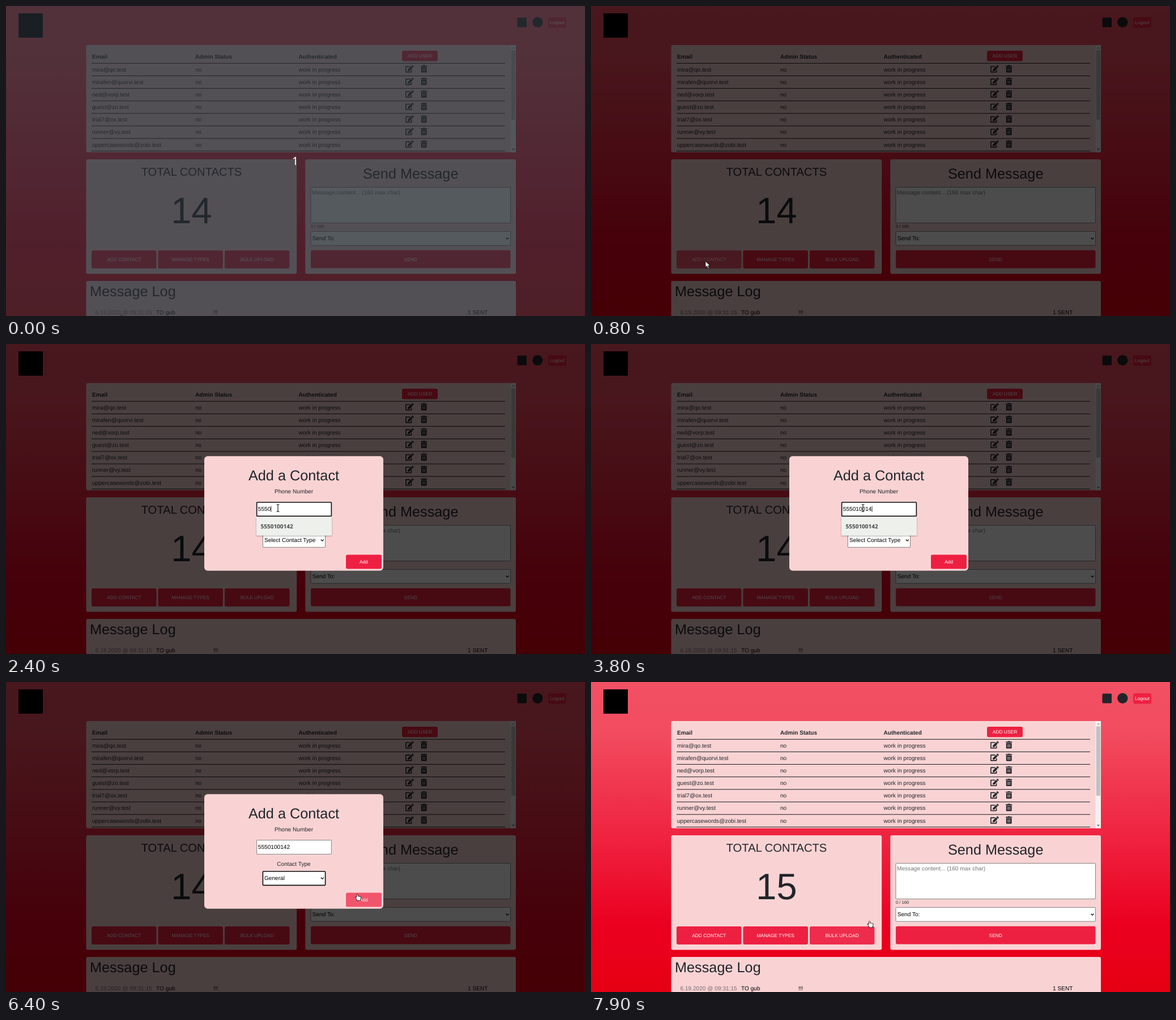
Write an HTML page that moves like this. It is 1022x548 px and loops after 8000 ms.

```html
<!DOCTYPE html>
<html lang="en">
<head>
<meta charset="utf-8">
<title>Add a contact</title>
<style>
  html, body { margin: 0; width: 100%; height: 100%; overflow: hidden; background: #ee2041; }
  svg { display: block; width: 1022px; height: 548px; }
  text { font: 10.12px "Liberation Sans", Arial, sans-serif; fill: #212529; white-space: pre; }
  .b { font-weight: bold; }
  .h1 { font-size: 25.28px; }
  .h2 { font-size: 20.22px; }
  .mid { text-anchor: middle; }
  .btn text { font-size: 8.43px; fill: #fff; text-anchor: middle; }
  .btn rect { fill: #ee2041; }
  .panel { fill: #f9d3d4; }
  .field { fill: #fff; stroke: #767676; stroke-width: .9; }
  .in { fill: #000; }
  .hint { fill: #757575; }
  .pop text { font-family: "Noto Sans", "Open Sans", sans-serif; font-size: 10px; font-weight: 600; fill: #454545; }
  .ring { fill: none; stroke: #101010; stroke-width: 1.6; }
  .chev { fill: none; stroke: #000; stroke-width: 1.3; }
</style>
</head>
<body>
<svg id="stage" viewBox="0 0 1022 548" text-rendering="geometricPrecision"></svg>
<script>
const LOOP = 8000, STEP = 100;
const PHONE = "5550100142", HINT = "555-010-0142";
const PAST = [PHONE, "5550100167", "5550100119", "5550100183", "5550100126", "5550100158"];
const EMAILS = ["mira@qo.test", "mirafen@quorvi.test", "ned@vorp.test", "guest@zo.test",
  "trial7@ox.test", "runner@vy.test", "uppercasewords@zobi.test"];
const TYPES = ["Select Contact Type", "General", "Reporters", "Medic"];
const ROW = 22.14, POP_ROW = 22.6, OPT = 20.2;

const text = (x, y, s, cls = "", id = "") => `<text x="${x}" y="${y}" class="${cls}" id="${id}">${s}</text>`;
const rect = (x, y, w, h, r = 0, attrs = "") =>
  `<rect x="${x}" y="${y}" width="${w}" height="${h}" rx="${r}" ${attrs}/>`;
const button = (x, y, w, h, s, id = "") =>
  `<g class="btn" id="${id}">${rect(x, y, w, h, 3)}${text(x + w / 2, y + h / 2 + 2.9, s)}</g>`;
const chevron = (x, y) => `<path class="chev" d="M${x - 2.4} ${y - 1.2}l2.4 2.4 2.4-2.4"/>`;

const tableRow = (email, i) => {
  const y = 115.7 + i * ROW, top = 104.6 + i * ROW;
  return text(152, y, email) + text(334, y, "no") + text(516.5, y, "work in progress") +
    `<use href="#edit" transform="translate(705 ${top}) scale(.0254)"/>
     <use href="#trash" transform="translate(732 ${top}) scale(.0254)"/>`;
};
const lines = Array.from({ length: 8 }, (_, i) => rect(151, 100.8 + i * ROW, 730, 1, 0, 'fill="#1b1b1e"')).join("");

const defs = `<defs>
  <linearGradient id="sky" x2="0" y2="1">
    <stop stop-color="#f25064"/><stop offset=".16" stop-color="#f24c60"/>
    <stop offset=".5" stop-color="#ef2340"/><stop offset=".78" stop-color="#eb0020"/>
    <stop offset="1" stop-color="#e60012"/>
  </linearGradient>
  <filter id="soft" x="-10%" y="-10%" width="120%" height="130%">
    <feDropShadow dx="0" dy="1" stdDeviation="1" flood-opacity=".4"/>
  </filter>
  <g id="edit" fill="#212529">
    <path d="M325 96H48Q32 96 32 112V464Q32 480 48 480H400Q416 480 416 464V315" fill="none" stroke="#212529" stroke-width="64"/>
    <path d="M160 416l10-115L396 76 500 180 274 406zM420 54l40-40q28-28 56 0l49 49q28 28 0 56l-40 40z"/>
  </g>
  <g id="trash" fill="#212529">
    <path d="M16 32H128L150 0H298L320 32H432Q448 32 448 48V80Q448 96 432 96H16Q0 96 0 80V48Q0 32 16 32z"/>
    <path fill-rule="evenodd" d="M32 128H416V464a48 48 0 0 1-48 48H80a48 48 0 0 1-48-48zM128 208v224h32V208zM208 208v224h32V208zM288 208v224h32V208z"/>
  </g>
</defs>`;

const page = rect(0, 0, 1022, 548, 0, 'fill="url(#sky)"') +
  rect(22, 13, 43, 43) +
  rect(902.5, 20.5, 16.5, 17, 1.5, 'fill="#212529"') +
  '<circle cx="938.3" cy="28.8" r="9.2" fill="#212529"/>' +
  button(957, 20, 32, 18.5, "Logout") +
  rect(141.5, 69, 758.5, 189.5, 3, 'class="panel"') +
  text(152, 93.2, "Email", "b") + text(334, 93.2, "Admin Status", "b") +
  text(516.5, 93.2, "Authenticated", "b") +
  button(699, 79, 63, 18.5, "ADD USER") + lines + EMAILS.map(tableRow).join("") +
  rect(890.5, 69, 9.5, 189.5, 0, 'fill="#f1f1f1"') + rect(891.8, 78.5, 7.2, 122.5, 0, 'fill="#c1c1c1"') +
  '<path d="M893 75.2h5l-2.5-2.6z" fill="#a3a3a3"/><path d="M893 252.5h5l-2.5 2.6z" fill="#505050"/>' +
  rect(141.5, 271, 371.7, 202.5, 3, 'class="panel"') +
  text(327.5, 300, "TOTAL CONTACTS", "h2 mid") +
  `<text id="count" x="327.5" y="384.3" class="mid" style="font-size:65px"></text>` +
  button(151, 432, 114.5, 32, "ADD CONTACT", "addContact") +
  button(268.5, 432, 114.5, 32, "MANAGE TYPES") +
  button(386, 432, 114.5, 32, "BULK UPLOAD", "bulk") +
  rect(528.3, 271, 371.7, 202.5, 3, 'class="panel"') +
  text(714.2, 304.8, "Send Message", "h1 mid") +
  rect(538, 320.5, 352.5, 63, 1.5, 'class="field" id="area"') +
  text(540, 333.2, "Message content... (160 max char)", "hint") +
  `<text x="538" y="392" style="font-size:7.6px">0 / 160</text>` +
  rect(538, 398.5, 352.5, 24.7, 1.5, 'class="field"') +
  text(540.7, 414.4, "Send To:", "in") + chevron(885, 411) +
  button(538, 431.7, 352.5, 31.8, "SEND") +
  rect(141.5, 486, 758.5, 70, 3, 'class="panel"') +
  text(148, 513.3, "Message Log", "h1") +
  `<text x="157.5" y="545" style="fill:#77696f">6.19.2020 @ 09:31:15</text>` +
  text(265, 545, "TO gub", "in") + text(366, 545, "!!!", "in") + text(815, 545, "1 SENT", "in");

const option = (s, i) =>
  `<g><rect class="hot" x="454" y="${380.9 + (i - 1) * OPT}" width="109" height="19.6" fill="#f07746" stroke="#000" stroke-width="1.4"/>
   ${text(456.3, 373.8 + i * OPT, s, i ? "in opt" : "hint opt")}</g>`;

const modal = `<g id="modal">` +
  rect(350, 198.3, 316, 202.5, 6, 'class="panel"') +
  text(508, 241.3, "Add a Contact", "h1 mid") +
  text(508, 263.6, "Phone Number", "mid") +
  rect(442.6, 279.6, 131.8, 24.8, .5, 'class="field" id="phoneBox"') +
  rect(442.6, 279.8, 131.8, 24.6, 1.5, 'class="ring" id="phoneRing"') +
  text(444.8, 295.3, "", "in", "phone") +
  rect(0, 286.5, .8, 10.5, 0, 'id="caret"') +
  text(508, 325, "Contact Type", "mid") +
  rect(453.4, 334.6, 110.2, 24.8, .5, 'class="field" id="typeBox"') +
  rect(453.4, 334.8, 110.2, 24.6, 1.5, 'class="ring" id="typeRing"') +
  text(456, 350.3, "", "in", "type") + chevron(558.3, 347) +
  button(600, 372.5, 63, 25, "Add", "add") +
  `<g id="past" class="pop">${rect(442, 305.5, 133, 33, 1, 'id="pastBox" fill="#eef0ec" filter="url(#soft)"')}` +
  PAST.map((s, i) => text(449.5, 325.6 + i * POP_ROW, s, "past")).join("") + "</g>" +
  `<g id="list">${rect(453.4, 360, 110.2, 81.6, 0, 'fill="#f7f7f7" stroke="#8a8a8a" stroke-width=".8"')}` +
  TYPES.map(option).join("") + "</g></g>";

const cursors = `<g id="cursor" stroke-linejoin="round">
  <path class="ptr" d="M0 0v11l2.6-2.4 1.7 4 2-.8-1.7-3.9h3.4z" fill="#fff" stroke="#111" stroke-width=".9"/>
  <path class="ptr" d="M-1.2.9V6.2L-2.6 5Q-4 4.6-3.6 6L-.8 9.5V11.5H5.5V9.5Q7 7 6.6 4.8 5 3.8 4.8 4.5 3.6 3.4 3.2 4.2 2 3.2 1.2 3.8V.9Q0-.9-1.2.9z" fill="#fff" stroke="#111" stroke-width=".9"/>
  <path class="ptr" d="M-2.4-6.5Q0-6.5 0-5 0-6.5 2.4-6.5M0-5V5M-2.4 6.5Q0 6.5 0 5 0 6.5 2.4 6.5" fill="none" stroke="#222" stroke-width="1.2"/>
</g>`;

document.getElementById("stage").innerHTML = defs + page +
  rect(0, 0, 1022, 548, 0, 'id="shade" fill="#000" fill-opacity=".7"') + modal + cursors +
  `<g id="start">${rect(0, 0, 1022, 548, 0, 'fill="#22292f" fill-opacity=".77"')}
   <text x="510.5" y="281" class="mid" style="font:20px 'Noto Sans',sans-serif;fill:#fff">1</text></g>`;

const $ = id => document.getElementById(id);
const all = cls => [...document.getElementsByClassName(cls)];
const ptrs = all("ptr"), hots = all("hot"), opts = all("opt"), past = all("past");
const ARROW = 0, HAND = 1, BEAM = 2;

// Rows are [time, value...]; each holds until the next.
const CURSOR = [
  [0, 203, 545, ARROW], [100, 203, 538, ARROW], [200, 203, 520, ARROW], [300, 203, 494, ARROW],
  [400, 203, 470, ARROW], [500, 203, 455, HAND], [600, 202, 451, HAND], [800, 202, 451, ARROW],
  [1000, 222, 440, ARROW], [1100, 285, 405, ARROW], [1200, 360, 365, ARROW], [1300, 425, 332, ARROW],
  [1400, 460, 315, ARROW], [1500, 470, 311, ARROW], [1700, 479, 293, BEAM], [1800, 480, 290, BEAM],
  [4600, 485, 303, ARROW], [4700, 494, 328, ARROW], [4800, 498, 341, ARROW], [5200, 498, 354, ARROW],
  [5300, 496, 375, ARROW], [5400, 494, 393, ARROW], [5500, 493, 401, ARROW], [5600, 493, 404, ARROW],
  [5700, 494, 399, ARROW], [5800, 495, 396, ARROW], [6000, 500, 394, ARROW], [6100, 535, 388, ARROW],
  [6200, 585, 381, ARROW], [6300, 613, 376, HAND], [6400, 620, 375, HAND], [6500, 623, 376, HAND],
  [6600, 624, 377, HAND], [6900, 624, 377, BEAM], [7500, 590, 392, ARROW], [7600, 520, 428, ARROW],
  [7700, 486, 443, HAND], [7800, 487, 436, HAND], [7900, 491.5, 422.5, HAND]
];
const START = [[0, 1], [100, .5], [200, .15], [300, 0]];
const MODAL = [[0, 0], [900, .6], [1000, 1], [6900, 0]];
const TYPED = [[0, 0], [2000, 1], [2100, 2], [2200, 3], [2400, 4], [2700, 5], [2900, 6],
  [3400, 7], [3700, 8], [3800, 9], [4100, 10]];
const MATCHES = [[0, 0], [1800, 6], [2100, 3], [2400, 1], [4200, 0]];
const HOT = [[0, 0], [5300, 1], [5500, 2], [5700, 1]];
const ADD_CONTACT = [[0, 1], [500, .85], [600, .7], [900, .85], [1000, 1]];
const ADD = [[0, 1], [6300, .85], [6400, .7]];
const BULK = [[0, 1], [7700, .85], [7800, .75], [7900, .92]];

const at = (rows, t) => rows.findLast(r => r[0] <= t).slice(1);
const show = (el, on) => { el.style.display = on ? "" : "none"; };
const fade = (id, rows, t) => { $(id).style.opacity = at(rows, t)[0]; };
const within = (t, a, b) => t >= a && t < b;

function draw(t) {
  const [x, y, kind] = at(CURSOR, t);
  $("cursor").setAttribute("transform", `translate(${x} ${y})`);
  ptrs.forEach((p, i) => show(p, i === kind));
  fade("start", START, t);
  fade("modal", MODAL, t);
  fade("addContact", ADD_CONTACT, t);
  fade("add", ADD, t);
  fade("bulk", BULK, t);
  show($("shade"), within(t, 800, 6900));
  $("count").textContent = t < 7100 ? "14" : "15";

  const [n] = at(TYPED, t);
  $("phone").textContent = n ? PHONE.slice(0, n) : HINT;
  $("phone").style.fill = n ? "#000" : "#757575";
  $("caret").setAttribute("x", 445 + n * 5.628);
  show($("caret"), within(t, 1800, 4600));
  show($("phoneRing"), within(t, 1800, 5000));

  const [rows] = at(MATCHES, t);
  show($("past"), rows);
  $("pastBox").setAttribute("height", 10.4 + rows * POP_ROW);
  past.forEach((p, i) => show(p, i < rows));

  const [hot] = at(HOT, t);
  show($("list"), within(t, 5000, 6000));
  hots.forEach((h, i) => show(h, i && i === hot));
  opts.forEach((o, i) => { o.style.fill = i && i === hot ? "#fff" : ""; });
  $("type").textContent = TYPES[t < 6000 ? 0 : 1];
  show($("typeRing"), t >= 6000);
  $("typeBox").style.stroke = within(t, 4800, 6000) ? "#4f4f4f" : "";
  $("area").style.stroke = within(t, 6900, 7500) ? "#4f4f4f" : "";
}

const t0 = performance.now();
function tick(now) {
  const t = Math.max(0, now - t0) % LOOP;
  draw(Math.floor(t / STEP) * STEP);
  requestAnimationFrame(tick);
}
draw(0);
requestAnimationFrame(tick);
</script>
</body>
</html>
```
